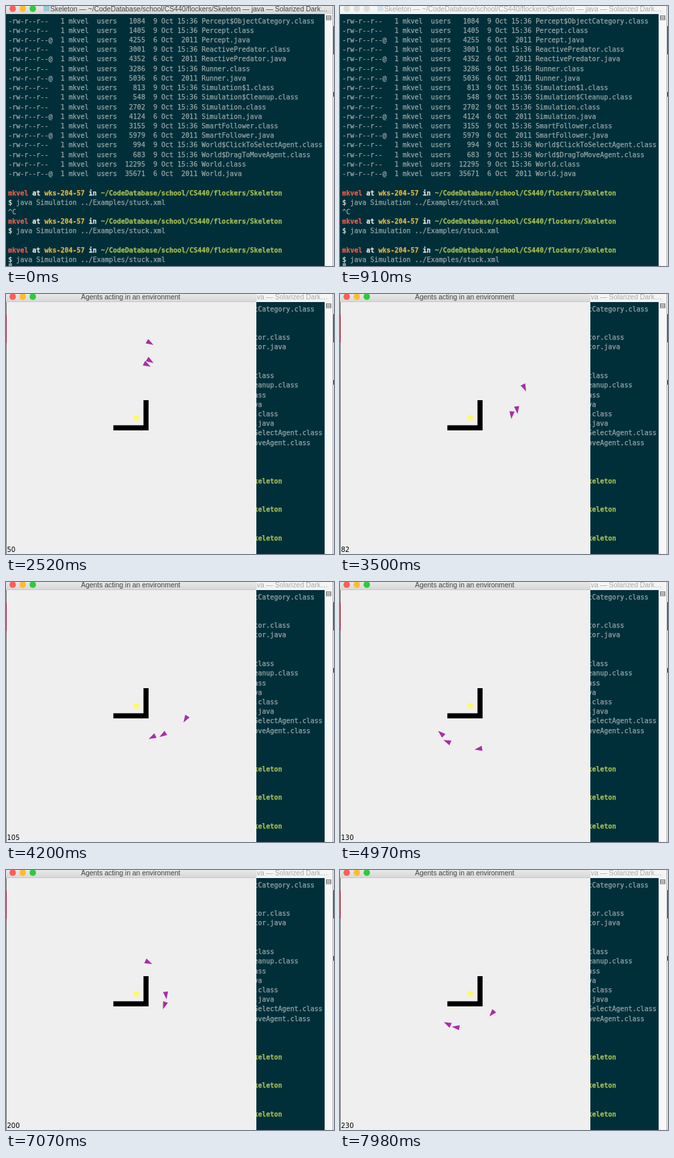
These frames come from a looping animation (490x387 px, 8000 ms). An HTML page with a canvas:

```html
<!DOCTYPE html>
<html lang="en">
<head>
<meta charset="utf-8">
<title>Agents acting in an environment</title>
<style>
  html, body { margin: 0; width: 100%; height: 100%; overflow: hidden; background: #fff; }
  canvas { display: block; }
</style>
</head>
<body>
<canvas id="stage" width="490" height="387"></canvas>
<script>
const ctx = document.getElementById('stage').getContext('2d');
const LOOP = 8000, STEP = 70;
const FOCUS_LOST = 700, WINDOW_OPENS = 980, RUN_STARTS = 993;
const TICKS_PER_MS = 0.03293, SPEED = 0.097;

const UI = '10.4px "Liberation Sans", Arial, sans-serif';
const MONO = '10px "DejaVu Sans Mono", monospace';
const CHAR = 6.02, LINE = 14.22, LEFT = 3.2;

const USER = 'mkvel', GROUP = 'users', HOST = 'wks-204-57';
const PATH = '~/CodeDatabase/school/CS440/flockers/Skeleton';
const COMMAND = 'java Simulation ../Examples/stuck.xml';
const DIM = '#98a7a7', PALE = '#e9e8dc';

// Size and name; sources carry an older date and an attribute mark.
const FILES = [
  [1084, 'Percept$ObjectCategory.class'], [1405, 'Percept.class'],
  [4255, 'Percept.java'], [3001, 'ReactivePredator.class'],
  [4352, 'ReactivePredator.java'], [3286, 'Runner.class'],
  [5036, 'Runner.java'], [813, 'Simulation$1.class'],
  [548, 'Simulation$Cleanup.class'], [2702, 'Simulation.class'],
  [4124, 'Simulation.java'], [3155, 'SmartFollower.class'],
  [5979, 'SmartFollower.java'], [994, 'World$ClickToSelectAgent.class'],
  [683, 'World$DragToMoveAgent.class'], [12295, 'World.class'],
  [35671, 'World.java']
];

// Waypoints per agent: x, y, heading in degrees.
const TIMES = [980, 1540, 3500, 4970, 5880, 7070, 7980];
const AGENTS = [
  [[75, 68, -12], [128, 57.5, -10], [275.5, 139.5, 65], [207, 248.5, 170],
   [141, 205, -100], [213, 137.5, 25], [227, 213.5, 130]],
  [[73, 93, -14], [126, 82, -10], [264.5, 172.5, 82], [160, 237.5, -158],
   [156.5, 155, -57], [239, 186.5, 82], [173, 234, -172]],
  [[83, 141, -56], [121, 104, -33], [256.5, 180, 95], [151, 225.5, -138],
   [168.5, 144, -50], [236.5, 201.5, 110], [160.5, 229, -155]]
];

function rect(color, x, y, w, h) {
  ctx.fillStyle = color;
  ctx.fillRect(x, y, w, h);
}

function disc(color, x, y, r) {
  ctx.fillStyle = color;
  ctx.beginPath();
  ctx.arc(x, y, r, 0, 7);
  ctx.fill();
}

function text(string, x, y, color, font) {
  ctx.font = font;
  ctx.fillStyle = color;
  ctx.fillText(string, x, y);
}

function termText(string, row, color, column = 0, bold = false) {
  const x = LEFT + column * CHAR, y = 25.6 + row * LINE;
  text(string, x, y, color, (bold ? 'bold ' : '') + MONO);
  // A hairline outline gives the heavier screen weight.
  ctx.strokeStyle = color;
  ctx.lineWidth = 0.25;
  ctx.strokeText(string, x, y);
}

function listing(size, name) {
  const source = name.endsWith('.java');
  return `-rw-r--r--${source ? '@' : ' '}  1 ${USER}  ${GROUP}  ${String(size).padStart(5)}  ` +
    `${source ? '6 Oct  2011' : '9 Oct 15:36'} ${name}`;
}

function prompt(row) {
  let column = 0;
  for (const [word, color] of [[USER, '#ec5b45'], ['at', PALE], [HOST, '#e2b341'],
                               ['in', PALE], [PATH, '#a3bd50']]) {
    termText(word, row, color, column, true);
    column += word.length + 1;
  }
  termText('$', row + 1, PALE);
  termText(COMMAND, row + 1, DIM, 2);
}

function titleBar(width, active) {
  const shade = ctx.createLinearGradient(0, 0, 0, 12);
  shade.addColorStop(0, active ? '#e8e8e8' : '#f6f6f6');
  shade.addColorStop(1, active ? '#d6d6d6' : '#f2f2f2');
  rect(shade, 0, 0, width, 12);
  const lights = active ? ['#f95f57', '#fbbd2e', '#2fc840'] : ['#ddd', '#ddd', '#ddd'];
  lights.forEach((color, i) => disc(color, 10 + 15 * i, 4, 4.8));
}

function drawTerminal(active) {
  rect('#fff', 0, 0, 490, 387);
  rect('#002f3a', 0, 12, 476, 375);
  titleBar(488, active);
  rect(active ? '#9cc7d8' : '#d3e3ea', 56, 0, 9, 8);
  text(`Skeleton — ${PATH} — java — Solarized Dark…`, 66, 7.7, active ? '#444' : '#aaa', UI);

  FILES.forEach(([size, name], row) => termText(listing(size, name), row, DIM));
  prompt(18);
  termText('^C', 20, DIM);
  prompt(21);
  prompt(24);
  rect('#83979a', 4, 383, 5, 4);

  rect('#f7f7f7', 476, 12, 12, 375);
  rect('#777', 478, 14, 8, 7);
  for (let y = 15; y < 21; y += 2) rect('#eee', 479, y, 6, 1);
  rect('#999', 488, 0, 1, 387);
  rect('#a32038', 489, 30, 1, 42);
  rect('#444', 489, 128, 1, 7);
}

function pose(points, t) {
  let i = 0;
  while (i < TIMES.length - 2 && t > TIMES[i + 1]) i++;
  const span = TIMES[i + 1] - TIMES[i], u = (t - TIMES[i]) / span;
  const [a, b] = [points[i], points[i + 1]];
  const tangent = (p, axis) =>
    SPEED * span * [Math.cos, Math.sin][axis](p[2] * Math.PI / 180);
  const hermite = axis => {
    const p = a[axis], q = b[axis], m = tangent(a, axis), n = tangent(b, axis);
    const c3 = 2 * p - 2 * q + m + n, c2 = 3 * q - 3 * p - 2 * m - n;
    return [((c3 * u + c2) * u + m) * u + p, (3 * c3 * u + 2 * c2) * u + m];
  };
  const [x, dx] = hermite(0), [y, dy] = hermite(1);
  return [x, y, Math.atan2(dy, dx)];
}

function drawAgent(x, y, angle) {
  ctx.save();
  ctx.translate(x, y);
  ctx.rotate(angle);
  ctx.fillStyle = '#aa2ca6';
  ctx.beginPath();
  ctx.moveTo(6, 0);
  ctx.lineTo(-5.3, -3.8);
  ctx.lineTo(-5.3, 3.8);
  ctx.fill();
  ctx.restore();
}

function drawSimulation(t) {
  rect('#efefef', 0, 12, 374, 375);
  titleBar(374, true);
  rect('#b9b9b9', 0, 11.5, 374, 0.5);
  rect('#777', 0, 12, 1, 375);
  rect('#a32038', 0, 31, 1, 41);
  text('Agents acting in an environment', 112, 7.7, '#444', UI);

  rect('#000', 205.4, 158, 7.6, 45);
  rect('#000', 160.4, 195.4, 52.6, 7.6);
  disc('#fbf96c', 194.5, 184.3, 4.4);

  const ticks = Math.max(0, Math.floor((t - RUN_STARTS) * TICKS_PER_MS));
  for (const points of AGENTS) drawAgent(...pose(points, t));
  text(ticks, 1.5, 384, '#000', '10px "DejaVu Sans", sans-serif');
}

function frame() {
  const t = Math.floor(performance.now() % LOOP / STEP) * STEP;
  drawTerminal(t < FOCUS_LOST);
  if (t >= WINDOW_OPENS) drawSimulation(t);
  requestAnimationFrame(frame);
}
frame();
</script>
</body>
</html>
```
